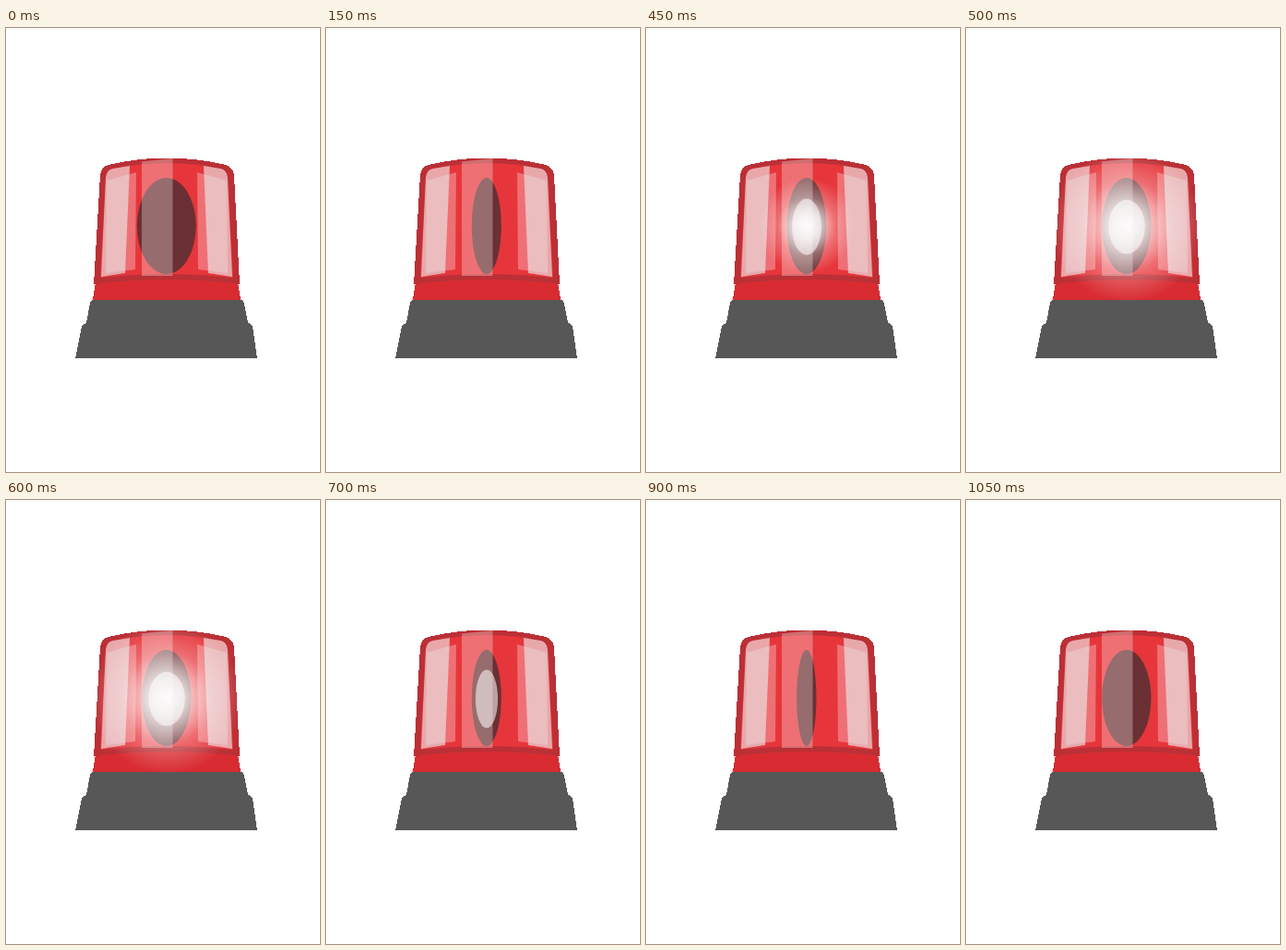
Write an HTML page that moves like this. It is 340 by 480 pixels and loops after 1100 ms.

```html
<!DOCTYPE html>
<html lang="en">
<head>
<meta charset="utf-8">
<title>Rotating beacon</title>
<style>
  html, body { margin: 0; width: 100%; height: 100%; overflow: hidden; background: #fff; }
  svg { display: block; width: 340px; height: 480px; }
  .hard { shape-rendering: crispEdges; }
</style>
</head>
<body>
<svg viewBox="0 0 340 480">
  <defs>
    <radialGradient id="light">
      <stop offset="0" stop-color="#fff" stop-opacity=".95"/>
      <stop offset=".25" stop-color="#fff" stop-opacity=".78"/>
      <stop offset=".6" stop-color="#fff" stop-opacity=".28"/>
      <stop offset="1" stop-color="#fff" stop-opacity="0"/>
    </radialGradient>
    <g id="panel">
      <path fill="#fff" fill-opacity=".29" d="M109 165 L141 156 L140 261 L108 265 Z"/>
      <path fill="#eaeaea" fill-opacity=".64" d="M103 269 L108 162 Q109 153 116 152 L134 149 L129 265 Z"/>
    </g>
  </defs>

  <!-- base and collar -->
  <path class="hard" fill="#d92c32" d="M98 270 H250 L255 298 H93 Z"/>
  <path class="hard" fill="#575757" d="M91 297 Q92 294 95 294 H254 Q257 294 258 298 L262 319 L265 320 L267 323 L272 357 H75 L82 323 L84 320 L87 319 Z"/>

  <!-- glass -->
  <path class="hard" fill="#bb3036" d="M95 277 L102 159 Q103 150 111 148 Q174 133 238 148 Q246 151 247 159 L253 277 Q174 267 95 277 Z"/>
  <path fill="#e6363b" d="M102 270 L108 161 Q109 154 116 152 Q174 140 232 152 Q239 154 240 161 L246 270 Q174 262 102 270 Z"/>

  <!-- rotating reflector -->
  <ellipse id="dish" cx="173.800" cy="214" ry="52" fill="#6b3033"/>
  <ellipse id="bulb" cx="174" cy="215" fill="#bda0a2"/>

  <path fill="#fff" fill-opacity=".29" d="M147 144.500 L180.500 141 V268 H147 Z"/>
  <use href="#panel"/>
  <use href="#panel" transform="matrix(-1 0 0 1 348 0)"/>
  <circle id="glow" cx="174" cy="214" fill="url(#light)"/>
</svg>
<script>
  const STEP = 50, STEPS = 22, HALF = STEPS / 2;
  const GLOW = [135, 82, 52];
  const [dish, bulb, glow] = ['dish', 'bulb', 'glow'].map(id => document.getElementById(id));

  function draw(now) {
    const step = Math.floor(now / STEP) % STEPS;
    const phase = step % HALF;
    const turn = Math.min(phase, HALF - phase); // steps away from facing straight on
    const front = step > 5 && step < 17;

    dish.setAttribute('rx', 32 * (1 - turn / 6));
    bulb.setAttribute('rx', front ? 23.5 - 3.8 * turn : 0);
    bulb.setAttribute('ry', front ? 28 + 1.2 * turn : 0);
    glow.setAttribute('r', front ? GLOW[turn] || 0 : 0);
  }

  const start = performance.now();
  function tick() {
    draw(performance.now() - start);
    requestAnimationFrame(tick);
  }
  tick();
</script>
</body>
</html>
```
